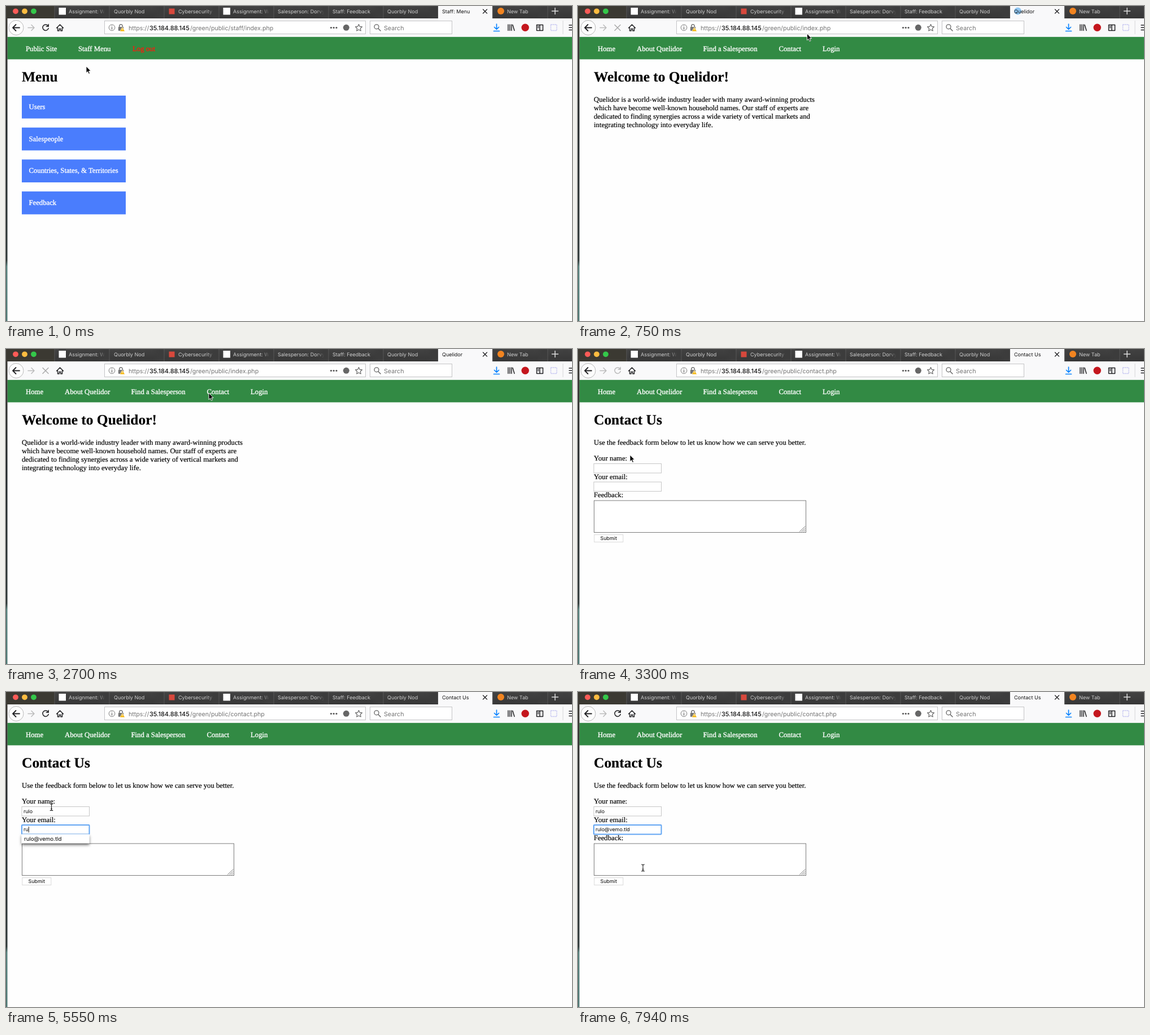
An HTML page that plays this animation: 1002 by 559 pixels, repeating every 8 s.

```html
<!DOCTYPE html>
<html lang="en">
<head>
<meta charset="utf-8">
<title>Contact form</title>
<style>
html, body { margin: 0; width: 100%; height: 100%; overflow: hidden; background: #fefefe; }
svg { display: block; width: 100%; height: 100%; }
text { white-space: pre; text-rendering: geometricPrecision; }
.ui { font-family: Inter, Roboto, sans-serif; }
.page { font: 12.73px "Liberation Serif", "Times New Roman", serif; stroke: #000; stroke-width: .18px; }
.head { font-size: 25.46px; font-weight: bold; }
.nav { fill: #fff; stroke: #fff; stroke-width: .35px; }
.exit { fill: #ff1a0c; stroke: #ff1a0c; stroke-width: .35px; }
.tab { font-size: 9px; fill: #cfcfcf; }
.url { font-size: 10.7px; fill: #737373; }
.host { font-size: 10.9px; font-weight: 500; fill: #111; }
.field { font-size: 8.9px; }
.icon { fill: none; stroke: #222224; stroke-width: 1.5; stroke-linecap: round; stroke-linejoin: round; }
</style>
</head>
<body>
<svg id="stage" viewBox="0 0 1002 559" xmlns="http://www.w3.org/2000/svg"></svg>
<script>
const LOOP = 8000;
const NAME = 'rulo';
const MAIL = 'rulo@vemo.tld';

const text = (x, y, s, cls, extra = '') => `<text x="${x}" y="${y}" class="${cls}" ${extra}>${s}</text>`;
const rect = (x, y, w, h, fill, extra = '') =>
  `<rect x="${x}" y="${y}" width="${w}" height="${h}" fill="${fill}" ${extra}/>`;
const disc = (x, y, r, fill, extra = '') => `<circle cx="${x}" cy="${y}" r="${r}" fill="${fill}" ${extra}/>`;
const icon = (d, extra = '') => `<path class="icon" d="${d}" ${extra}/>`;
const group = (id, body, extra = '') => `<g id="${id}" ${extra}>${body}</g>`;
const nav = items => items.map(([x, s]) => text(x, 79.6, s, 'page nav')).join('');
const box = (x, y, w, h, stroke) => rect(x, y, w, h, '#fff', `stroke="${stroke}"`);

const defs = `<defs>
  <linearGradient id="fade"><stop offset="0" stop-color="#3c3c3c" stop-opacity="0"/><stop offset="1" stop-color="#3c3c3c"/></linearGradient>
  <linearGradient id="bar" x2="0" y2="1"><stop offset="0" stop-color="#424242"/><stop offset="1" stop-color="#373737"/></linearGradient>
  <linearGradient id="desk" x2="0" y2="1">
    <stop offset="0" stop-color="#35332d"/><stop offset=".35" stop-color="#1d2326"/>
    <stop offset=".8" stop-color="#2a3434"/><stop offset=".82" stop-color="#557f7a"/><stop offset="1" stop-color="#4c7672"/>
  </linearGradient>
  <filter id="shadow" x="-10%" y="-50%" width="120%" height="220%">
    <feDropShadow dx="0" dy="3" stdDeviation="2.4" flood-opacity=".55"/>
  </filter>
</defs>`;

function tabBar() {
  const tabs = [
    [111, 'Assignment: We'], [191, 'Quorbly Nod'], [305, 'Cybersecurity ('], [402, 'Assignment: We'],
    [481, 'Salesperson: Dorvy'], [578, 'Staff: Feedback'], [675, 'Quorbly Nod'], [0, ''], [887, 'New Tab']
  ];
  let out = rect(0, 0, 1002, 22, 'url(#bar)') + rect(0, 0, 86, 22, '#3b3932');
  tabs.forEach(([x, s], i) => {
    const left = 86 + i * 97;
    out += text(x, 12.7, s, 'ui tab') + rect(left + 76, 1, 13, 20, 'url(#fade)') +
      rect(left + 89, 1, 7, 20, '#3c3c3c') + rect(left - .5, 0, 1, 22, '#565656');
  });
  out += rect(958.5, 0, 1, 22, '#565656');
  out += ['#fc5b57', '#fdbc40', '#34c84a'].map((c, i) => disc(17 + i * 16, 9.3, 4.9, c)).join('');
  out += [93.5, 384.5].map(x => rect(x, 3, 12.5, 12.5, '#fff')).join('');
  out += rect(288.5, 4.5, 10, 10, '#d8483c') + disc(876, 9, 6, '#f28420');
  out += icon('M966.5 9H977.5M972 3.5V14.5', 'style="stroke:#ddd"');
  out += rect(765, 0, 96, 22, '#f9f9fa') + disc(778.5, 9, 6.5, '#91c8f3', 'id="dot"');
  out += text(772, 12.7, '', 'ui tab', 'id="title" style="fill:#111"');
  return out + icon('M844.5 6L851.5 13M851.5 6L844.5 13', 'style="stroke-width:1.3"');
}

function toolbar() {
  const dashed = 'stroke-dasharray="2 1.6" style="stroke:#c9c9f2;stroke-width:1.3"';
  return rect(0, 22, 1002, 32.6, '#f9f9fa') +
    disc(18, 38.5, 13, '#fdfdfd', 'stroke="#b9b9b9"') +
    icon('M24 38.5H12.5M17.5 33L12 38.5L17.5 44', 'style="stroke-width:1.8"') +
    icon('M39 38.5H50M45 33.5L50 38.5L45 43.5', 'style="stroke:#bbb"') +
    icon('M74.3 35A5.2 5.2 0 1 0 75.2 39.5M75.2 32.5V36.3H71.3', 'id="reload"') +
    icon('M65 33.5L75 43.5M75 33.5L65 43.5', 'id="stop" style="stroke:#aaa"') +
    icon('M89.5 39L95.5 33L101.5 39M91.5 38.5V44H94.2V40.5H96.8V44H99.5V38.5') +
    box(174.5, 26.5, 462, 23, '#c4c4c6') + box(644.5, 26.5, 145, 23, '#c4c4c6') +
    icon('M187.5 37.7V41.3M187.5 35.2V35.3', 'style="stroke:#777;stroke-width:1.4"') +
    disc(187.5, 38.3, 5.3, 'none', 'stroke="#777"') +
    icon('M200.7 37V35.5A2.8 2.8 0 0 1 206.3 35.5V37', 'style="stroke:#777"') +
    rect(198.8, 37, 9.4, 7, '#777', 'rx="1"') +
    '<path d="M206 37.5L210.5 45H201.5Z" fill="#f5b60c" stroke="#fff" stroke-width=".6"/>' +
    rect(205.5, 40, 1, 2.6, '#fff') +
    text(217, 42.6, 'https://', 'ui url') +
    text(254, 42.6, '35.184.88.145', 'ui host') +
    text(326, 42.6, '', 'ui url', 'id="path"') +
    [575.5, 580.2, 585].map(x => disc(x, 38.5, 1.6, '#555')).join('') +
    disc(602.3, 38.3, 5.5, '#666') +
    icon('M624.5 32.5L626.3 36.4L630.5 36.9L627.4 39.8L628.2 44L624.5 41.9L620.8 44L621.6 39.8L618.5 36.9L622.7 36.4Z', 'style="stroke:#666;stroke-width:1.2"') +
    disc(656, 36.8, 4, 'none', 'stroke="#666" stroke-width="1.3"') +
    icon('M659 40L663 44', 'style="stroke:#666"') +
    text(669, 42.6, 'Search', 'ui url') +
    icon('M868.5 32V41M864.5 37.5L868.5 41.3L872.5 37.5M863.5 44.5H873.5', 'style="stroke:#0a84ff;stroke-width:1.7"') +
    icon('M889 33V43.5M892 33V43.5M895 33V43.5M897 33.5L900 43.5') +
    disc(919.2, 38.3, 6.7, '#c4161d') +
    icon('M939.5 33.5H950.5V43.5H939.5ZM945 33.5V43.5M941.5 36H943M941.5 38.5H943') +
    rect(964.5, 33, 10.5, 10.5, 'none', `class="icon" ${dashed}`) +
    rect(985.5, 26, 1, 24, '#d5d5d7') +
    icon('M997 34H1003M997 38.3H1003M997 42.6H1003');
}

function menuPage() {
  const tiles = ['Users', 'Salespeople', 'Countries, States, &amp; Territories', 'Feedback'];
  return nav([[35, 'Public Site'], [128, 'Staff Menu']]) +
    text(224, 79.6, 'Log out', 'page exit') +
    text(28, 133.6, 'Menu', 'page head') +
    tiles.map((s, i) => rect(28, 159 + i * 56.7, 184, 40.6, '#4a7dfd') +
      text(40.5, 183 + i * 56.6, s, 'page nav')).join('');
}

function homePage() {
  const lines = [
    'Quelidor is a world-wide industry leader with many award-winning products',
    'which have become well-known household names. Our staff of experts are',
    'dedicated to finding synergies across a wide variety of vertical markets and',
    'integrating technology into everyday life.'
  ];
  return text(28, 133.6, 'Welcome to Quelidor!', 'page head') +
    lines.map((s, i) => text(28, 170.4 + i * 15, s, 'page')).join('');
}

function contactPage() {
  return text(28, 133.6, 'Contact Us', 'page head') +
    text(28, 170.4, 'Use the feedback form below to let us know how we can serve you better.', 'page') +
    text(28, 198, 'Your name:', 'page') + text(28, 230.7, 'Your email:', 'page') +
    text(28, 263.2, 'Feedback:', 'page') +
    box(28, 203.5, 119.5, 16.5, '#c6c6c6') + box(28, 236, 119.5, 16.5, '#c6c6c6') +
    box(28.5, 269, 375, 56.5, '#7c7c7c') +
    icon('M392.5 324L402 315M396 324L402 318.5M399.5 324L402 321.8', 'style="stroke:#666;stroke-width:.9"') +
    box(28.8, 329.6, 51, 13, '#d9d9d9') +
    text(39.6, 339.2, 'Submit', 'ui field') +
    rect(28, 203.5, 119.5, 16.5, '#fff', 'id="ring" stroke="#62a5f3" stroke-width="2" rx="1"') +
    text(31, 214.8, '', 'ui field', 'id="name"') + text(31, 247.3, '', 'ui field', 'id="mail"') +
    rect(0, 0, .9, 10.5, '#000', 'id="caret"') +
    group('popup', rect(27.5, 252.3, 120, 16.2, '#fff', 'filter="url(#shadow)"') +
      rect(28, 252.6, 117, 15.6, '#b5d5ff', 'id="hover"') +
      text(32, 264, MAIL, 'ui', 'font-size="9.7"'));
}

const stage = document.getElementById('stage');
stage.innerHTML = defs + rect(0, 0, 1002, 559, '#fefefe') + rect(2.5, 54.6, 1000, 40, '#328a44') +
  group('menu', menuPage()) +
  group('site', nav([[35, 'Home'], [104, 'About Quelidor'], [221.5, 'Find a Salesperson'], [355.5, 'Contact'], [433, 'Login']])) +
  group('home', homePage()) + group('contact', contactPage()) +
  toolbar() + tabBar() + rect(0, 22, 2.5, 537, 'url(#desk)') +
  group('arrow', '<path d="M0 0V11.8L2.7 9.3L4.5 13.5L6.5 12.6L4.7 8.6H8.2Z" stroke="#fff" stroke-width=".9"/>') +
  group('beam', '<path d="M-2.8 -6Q0 -6 0 -4V4Q0 6 -2.8 6M2.8 -6Q0 -6 0 -4M0 4Q0 6 2.8 6M-1.5 2.5H1.5" fill="none" stroke="#222" stroke-width="1.1"/>');

const el = {};
stage.querySelectorAll('[id]').forEach(e => el[e.id] = e);
const show = (id, on) => el[id].style.display = on ? '' : 'none';

// Last value whose start time has passed.
const at = (keys, t) => keys.reduce((v, [start, ...rest]) => t >= start ? rest : v, []);

const POINTER = [
  [0, 142, 107], [150, 88, 90], [300, 55, 74], [750, 405.5, 49], [900, 398, 52], [1050, 386, 56],
  [1200, 372, 61], [1350, 354, 67], [1500, 338, 73], [1650, 300, 76], [1800, 279, 78], [1950, 276, 78],
  [2250, 318, 78], [2400, 359, 78], [2850, 340, 88], [3000, 240, 125], [3150, 145, 165], [3300, 92, 188],
  [3450, 85, 196], [3600, 80.5, 204.5, 'beam'], [6000, 78, 216, 'beam'], [6150, 72, 240, 'beam'],
  [6300, 66, 259], [6450, 62, 268], [7050, 64, 267], [7350, 68, 274], [7500, 84, 289, 'beam'],
  [7650, 101, 302, 'beam'], [7800, 111, 309, 'beam'], [7940, 115, 312, 'beam']
];
const VIEW = [
  [0, 'menu', 'Staff: Menu', 'staff/index.php'],
  [750, 'home', 'Quelidor', 'index.php'],
  [2850, 'contact', 'Contact Us', 'contact.php']
];
const LOADING = [[0, 'ready'], [600, 'stop'], [900, 'grey'], [1500, 'ready'], [2700, 'stop'], [3000, 'grey'], [3600, 'ready']];
const NAME_LEN = [[0, 0], [4500, 1], [4650, 2], [4800, 3], [4950, 4]];
const MAIL_LEN = [[0, 0], [5100, 1], [5550, 2], [5700, 3], [6900, MAIL.length]];

function render(t) {
  const [view, title, path] = at(VIEW, t);
  ['menu', 'home', 'contact'].forEach(id => show(id, id === view));
  show('site', view !== 'menu');
  el.title.textContent = title;
  el.path.textContent = '/green/public/' + path;

  const [load] = at(LOADING, t);
  show('stop', load === 'stop');
  show('reload', load !== 'stop');
  show('dot', (t >= 750 && t < 900) || (t >= 2850 && t < 3000));
  el.reload.style.stroke = load === 'grey' ? '#bbb' : '';

  el.name.textContent = NAME.slice(0, at(NAME_LEN, t)[0]);
  el.mail.textContent = MAIL.slice(0, at(MAIL_LEN, t)[0]);
  const onMail = t >= 5100;
  show('ring', t >= 3900);
  el.ring.setAttribute('y', onMail ? 236 : 203.5);
  show('caret', t >= 3900 && t < 6900);
  if (view === 'contact') {
    const input = onMail ? el.mail : el.name;
    const width = input.textContent ? input.getComputedTextLength() : 0;
    el.caret.setAttribute('x', 31.2 + width);
    el.caret.setAttribute('y', onMail ? 238.8 : 206.3);
  }
  show('popup', onMail && t < 7350);
  show('hover', t >= 6300);

  const [x, y, shape = 'arrow'] = at(POINTER, t);
  ['arrow', 'beam'].forEach(id => show(id, id === shape));
  el[shape].setAttribute('transform', `translate(${x} ${y})`);
}

const begin = performance.now();
function tick() {
  render((performance.now() - begin) % LOOP);
  requestAnimationFrame(tick);
}
tick();
</script>
</body>
</html>
```
